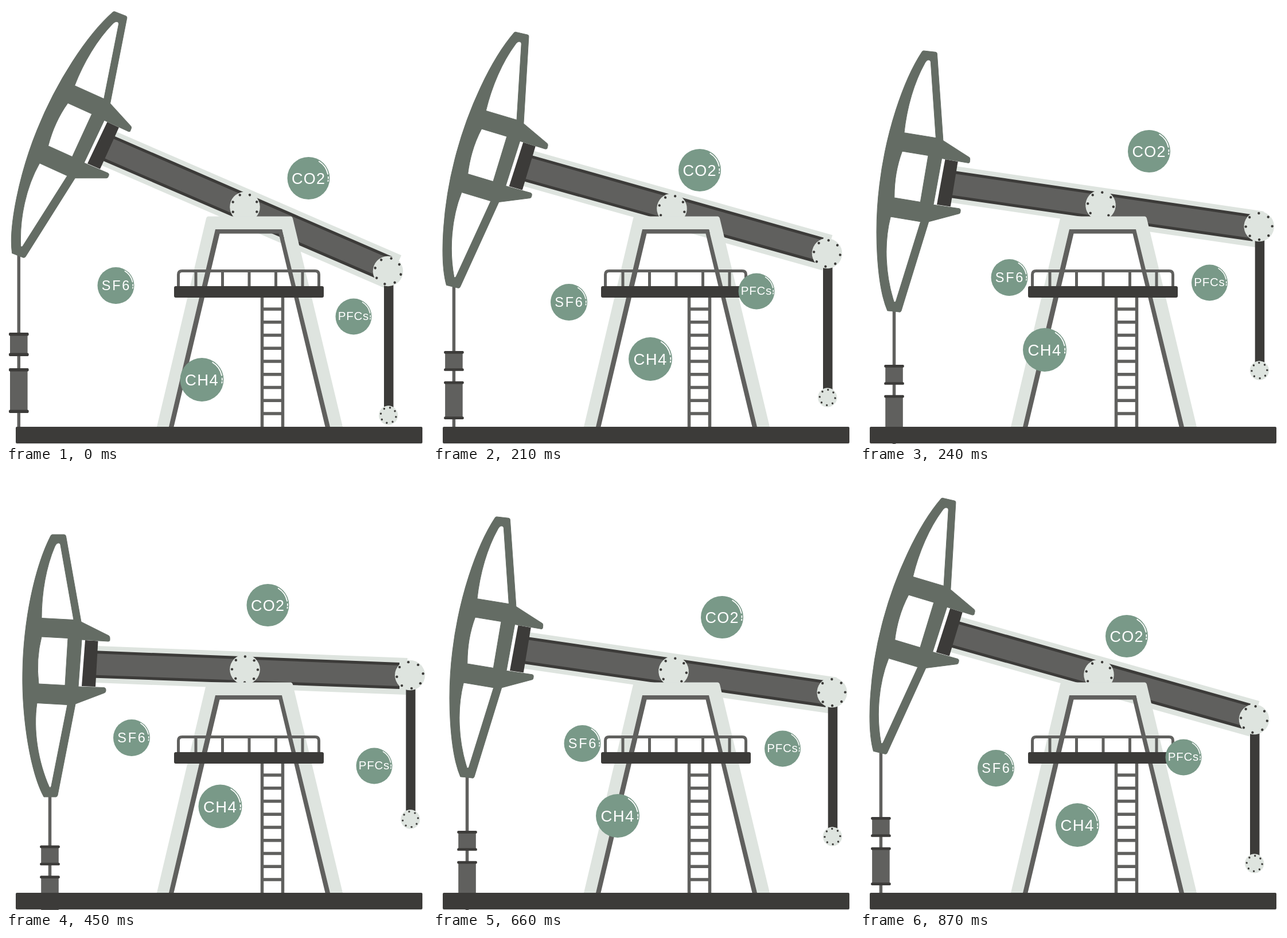
Animation of 734x763 px, one loop 0.9 s. Source, as an HTML page:

```html
<!DOCTYPE html>
<html lang="en">
<head>
<meta charset="utf-8">
<title>Pumpjack</title>
<style>
  html, body { margin: 0; width: 100%; height: 100%; overflow: hidden; background: #fff; }
  svg { display: block; width: 100%; height: 100%; }
  text { font-family: "Liberation Sans", Arial, sans-serif; fill: #fff; text-anchor: middle; }
  .head { fill: #646c64; stroke: #646c64; }
  .gray { fill: #60605e; }
  .dark { fill: #3c3b39; }
  .light { fill: #dee4df; }
  .bubble { fill: #799988; }
  .line { fill: none; stroke: #60605e; }
  .shine { fill: none; stroke: #fff; stroke-linecap: round; }
</style>
</head>
<body>
<svg viewBox="0 0 734 763">
  <path id="wire" class="line" stroke-width="5.5"/>
  <g id="weights"></g>

  <g id="beam">
    <path class="light" d="M159 303L700 324L697 388L156 367Z"/>
    <path class="dark" d="M150 311L686 332V378L150 358.500Z"/>
    <path class="gray" d="M150 316L686 337V373L150 353.500Z"/>
    <path class="dark" d="M138 293L160.500 294.500L156 374L132 373Z"/>
    <path class="head" fill-rule="evenodd" d="
      M66 566C43 525 27.500 430 29 350C30 260 50 165 78 111Q79 109 81 109H101Q104 109 104.500 112
      L131 261L179 285Q181 286 181 289V293Q181 295 178 295L132 292L126 374L171 375.500
      Q174 376 174 379V381Q174 384 171 385L121 404L90 563Q89 566 87 566Z
      M62 254.500L118 257.500L95 127Q94 123 90 124Q87 125 85 130C70 165 62 210 62 254.500Z
      M62 287L108 289.500L103 371.500L57 369Q52 326 62 287Z
      M54 402.500L107 405.500L79 547Q78 551 75.500 549C56 505 47 450 54 402.500Z"/>
  </g>

  <g id="pivot"></g>
  <g id="pitman">
    <rect class="dark" x="-7" width="16.500" height="250"/>
  </g>
  <g id="pin"></g>
  <g id="crank"></g>

  <path class="light" fill-rule="evenodd"
    d="M353 366.500H496Q499 366.500 500 370L587 733H263L349 370Q350 366.500 353 366.500ZM365 389L284 733H565L481 389Z"/>
  <path class="gray" fill-rule="evenodd" d="M365 389H481L565 733H284ZM372.500 396.500L292.500 733H556.500L475.500 396.500Z"/>

  <path id="rail" class="line" stroke-width="5"/>
  <path id="ladder" class="line" stroke-width="5.500"/>
  <rect class="dark" x="293" y="488" width="261" height="20" rx="3"/>
  <rect class="dark" x="17" y="733" width="709" height="29" rx="2"/>
  <g id="bubbles"></g>
</svg>

<script>
const NS = "http://www.w3.org/2000/svg";
const $ = id => document.getElementById(id);

function add(parent, tag, attrs, content = "") {
  const el = document.createElementNS(NS, tag);
  for (const key in attrs) el.setAttribute(key, attrs[key]);
  el.textContent = content;
  parent.appendChild(el);
  return el;
}

function place(el, [x, y], rest = "") {
  el.setAttribute("transform", `translate(${x} ${y}) ${rest}`);
}

function polar(r, deg) {
  const a = deg * Math.PI / 180;
  return [r * Math.cos(a), r * Math.sin(a)];
}

// Round plate with eight bolts
function plate(parent, r, ring, bolt, offset) {
  add(parent, "circle", { class: "light", r });
  for (let i = 0; i < 8; i++) {
    const [cx, cy] = polar(ring, offset + i * 45);
    add(parent, "circle", { class: "dark", cx, cy, r: bolt });
  }
}

plate($("pivot"), 26.3, 22.5, 2.2, 1);
plate($("pin"), 26.3, 23, 2.2, -7);
plate($("crank"), 16.7, 13.5, 1.7, -9);

// Two blocks with end caps; y runs down from the first cap
for (const [top, bottom] of [[0, 41], [62, 140]]) {
  add($("weights"), "rect", { class: "gray", x: -15.3, y: top + 2, width: 30.6, height: bottom - top - 4 });
  for (const y of [top, bottom - 5.5])
    add($("weights"), "rect", { class: "dark", x: -17.3, y, width: 34.6, height: 5.5, rx: 2 });
}

let rail = "M300.500 490V468Q300.500 461.500 307 461.500H539Q545.500 461.500 545.500 468V490";
for (let i = 0; i < 5; i++) rail += `M${331 + i * 46.5} 461V490`;
$("rail").setAttribute("d", rail);

let ladder = "M446.500 508V733M482.500 508V733";
for (let i = 0; i < 9; i++) ladder += `M446 ${528 + i * 22.75}H483`;
$("ladder").setAttribute("d", ladder);

function arc(r, from, to) {
  return `M${polar(r, from)}A${r} ${r} 0 0 1 ${polar(r, to)}`;
}

function bubble(label, r, size, spacing, base) {
  const g = add($("bubbles"), "g", {});
  add(g, "circle", { class: "bubble", r });
  const ring = r * 0.93;
  add(g, "path", {
    class: "shine", "stroke-width": r * 0.05,
    d: arc(ring, -58, -12) + arc(ring, -4, 1) + arc(ring, 6, 9)
  });
  add(g, "text", { x: spacing / 2 - 0.5, y: base, "font-size": size, "letter-spacing": spacing }, label);
  return g;
}

const bubbles = [
  bubble("CO2", 37, 27, 1.2, 9.5),
  bubble("SF6", 32, 23.5, 2.8, 8),
  bubble("CH4", 38, 27.5, 1.4, 10),
  bubble("PFCs", 31.5, 20.5, 0.8, 6)
];

// The beam turns about its clamp corner; each pose is held, then cut
const CLAMP = [132, 373];
const poses = [
  { turn: 21.2, clamp: [142, 274.5], pivot: [416.5, 350], pin: [666, 462],
    wire: [22.3, 425], weight: 569, squash: 1,
    gas: [[527.5, 300], [191.5, 487], [341.5, 651], [606, 541]] },
  { turn: 13.5, clamp: [132.7, 314], pivot: [416.5, 353], pin: [687, 431],
    wire: [36.4, 482], weight: 601, squash: 0.85,
    gas: [[465, 286], [237, 516], [379, 615], [564, 497]] },
  { turn: 6.1, clamp: [134, 346], pivot: [419.5, 347], pin: [695.7, 384],
    wire: [59.5, 522], weight: 625, squash: 0.85,
    gas: [[504, 253], [260.5, 473], [322, 599], [609.5, 482]] },
  { turn: 0, clamp: CLAMP, pivot: [416.5, 344], pin: [704.3, 354],
    wire: [76.5, 556], weight: 650.5, squash: 0.85,
    gas: [[456.5, 232], [219, 463], [373.5, 582.5], [642, 512]] }
];

const LOOP = 900;
const cues = [[0, 0], [210, 1], [240, 2], [450, 3], [660, 2], [870, 1]];

function draw(ms) {
  const t = ms % LOOP;
  const pose = poses[cues.filter(([start]) => start <= t).pop()[1]];
  const [x, top] = pose.wire;
  const [px, py] = pose.pin;
  const spin = `rotate(${pose.turn})`;
  place($("beam"), pose.clamp, `${spin} translate(${-CLAMP[0]} ${-CLAMP[1]})`);
  place($("pivot"), pose.pivot, spin);
  place($("pitman"), pose.pin);
  place($("pin"), pose.pin, spin);
  place($("crank"), [px + 0.7, py + 251], spin);
  place($("weights"), [x, pose.weight], `scale(1 ${pose.squash})`);
  $("wire").setAttribute("d", `M${x} ${top}V${pose.weight + 165 * pose.squash}`);
  bubbles.forEach((b, i) => place(b, pose.gas[i]));
}

const start = performance.now();
function tick() {
  draw(performance.now() - start);
  requestAnimationFrame(tick);
}
tick();
</script>
</body>
</html>
```
